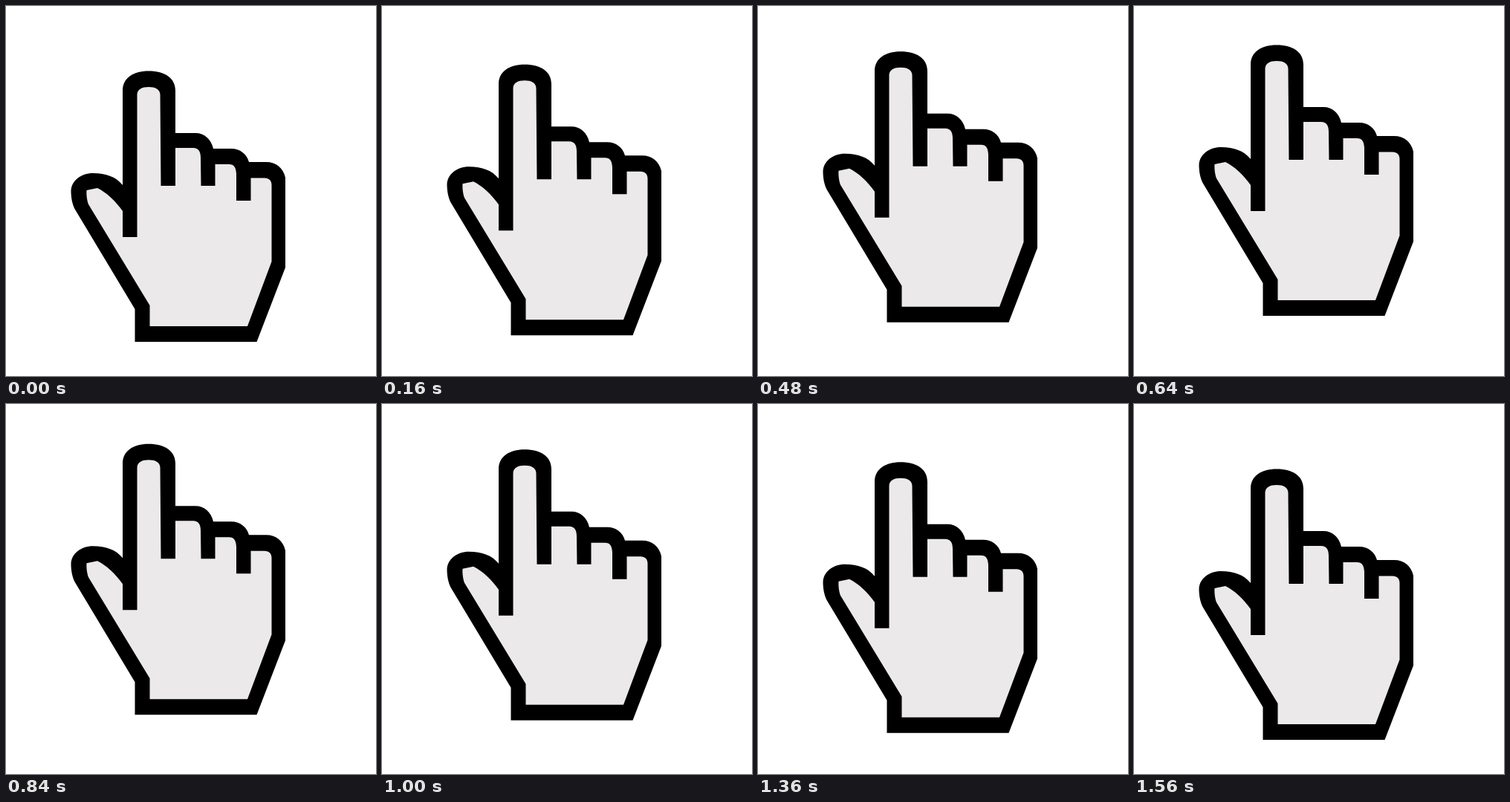
Animation of 498 by 498 pixels, one loop 1.6 s. Source, as an HTML page:

```html
<!DOCTYPE html>
<html lang="en">
<head>
<meta charset="utf-8">
<title>Pointing hand</title>
<style>
  html, body { margin: 0; width: 100%; height: 100%; overflow: hidden; background: #fff; }
  svg { display: block; width: 100vw; height: 100vh; }
</style>
</head>
<body>
<svg viewBox="0 0 498 498">
  <g id="hand">
    <path fill="#000" d="M157 241 V114 C157 97 171 87.5 192 87.5 C214 87.5 228 97 228 114
      V171 H255 C267 171 276 179 279 192 H303 C315 192 324 199 327 210 H350
      C364 210 373 218 376 231 V352 L337.500 452 H173.500 V408 L93 274
      C89 267 87.500 257 87.500 249 C88 235 101 225 117 225 C135 225 148 230 157 241 Z"/>
    <path fill="#ebe9ea" d="M176.500 311 V119 C177 112 183 109 192 109 C201 109 207 112 207.500 119
      L208.500 242 H228 V191 H252 C259 191 262 196 262 204 L262.500 242 H281.500 V213 H300
      C307 213 309.500 217 310 226 V262 H329.500 V231.500 H348 C354 231.500 357.500 235 357.500 241
      V344 L325 431 H193.500 V403 L111 267 C109 262 108 254 108.500 248 L123 245
      C134 250 148 263 157 276 V311 Z"/>
  </g>
</svg>
<script>
  const LOOP = 1600, STEP = 40, PEAK = 18, LAST = 39, LIFT = 39.3;
  const hand = document.getElementById('hand');

  // Steady rise to the peak, then a slightly slower steady descent.
  function lift(i) {
    return LIFT * (i < PEAK ? i / PEAK : (LAST - i) / (LAST - PEAK));
  }

  function draw(now) {
    const i = Math.floor((now % LOOP) / STEP);
    hand.setAttribute('transform', `translate(0 ${-lift(i)})`);
  }

  function tick() {
    draw(performance.now() - start);
    requestAnimationFrame(tick);
  }

  const start = performance.now();
  tick();
</script>
</body>
</html>
```
